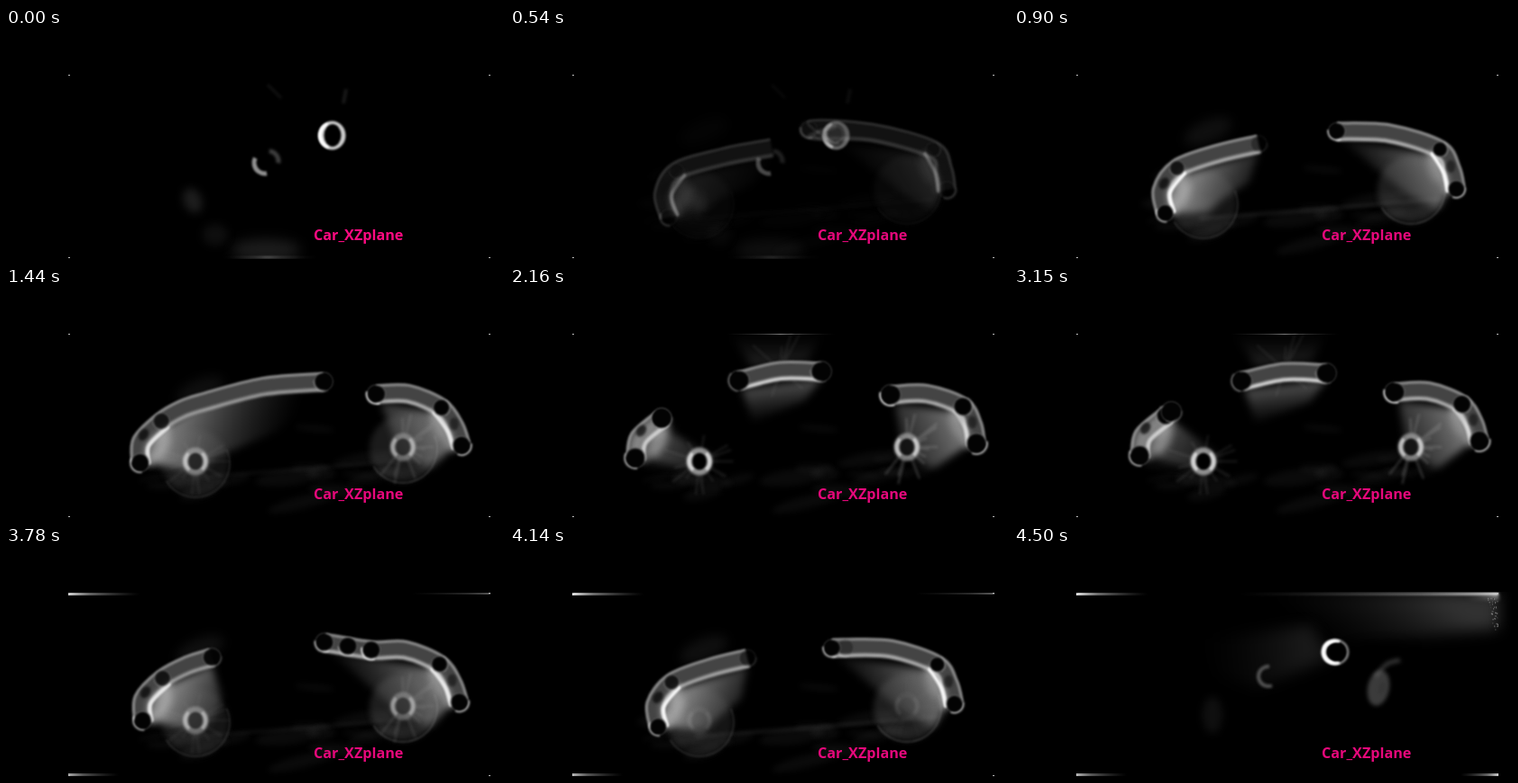
Animation of 552x257 px, one loop 5.22 s. Source, as an HTML page with a canvas:

```html
<!DOCTYPE html>
<html lang="en">
<head>
<meta charset="utf-8">
<title>Car slices</title>
<style>
html, body { margin: 0; width: 100%; height: 100%; overflow: hidden; background: #000; }
canvas { position: absolute; left: 0; top: 0; width: 552px; height: 257px; }
p {
  position: absolute; left: 341px; top: 219px; margin: 0; white-space: pre;
  font: 700 16.2px/22px "Open Sans", "Noto Sans", sans-serif; color: #f0087f;
}
</style>
</head>
<body>
<canvas width="552" height="257"></canvas>
<p>Car_XZplane</p>
<script>
const ctx = document.querySelector('canvas').getContext('2d');
const label = document.querySelector('p');
const LOOP = 5220, START = 540, END = 4500, STEP = 90, CENTER = 2560;
const HUBS = [[210, 194], [440, 178]];

// Each tube slides from its place at mid-car to its place at the side.
const tubes = {
  nose: { from: [139, 190], to: [168, 206], bend: 1.75 },
  grille: { from: [168, 146], to: [181, 156], bend: 1.8 },
  hood: { from: [168, 146], to: [272, 129], bend: 1.15, lift: 10 },
  roof: { from: [345, 94], to: [358, 115], bend: 1 },
  deck: { from: [422, 120], to: [360, 115], bend: 2.7 },
  tail: { from: [502, 133], to: [472, 135], bend: .7 },
  bumper: { from: [517, 174], to: [490, 179], bend: 1.3 }
};

const gray = (v, a = 1) => `rgba(${v},${v},${v},${a})`;
const mix = (p, q, u) => p.map((v, i) => v + (q[i] - v) * u);
const move = (p, x, y) => [p[0] + x, p[1] + y];
const mid = (p, q, x = 0, y = 0) => move(mix(p, q, .5), x, y);
const gap = (p, q) => Math.hypot(p[0] - q[0], p[1] - q[1]);
const ramp = (a, b, x) => Math.min(1, Math.max(0, (x - a) / (b - a)));

function seeded(s) {
  return () => (s = (s * 16807) % 2147483647) / 2147483647;
}

function paint(alpha, blur, draw) {
  if (alpha <= .01) return;
  ctx.save();
  ctx.globalAlpha = Math.min(1, alpha);
  ctx.filter = blur ? `blur(${blur}px)` : 'none';
  draw();
  ctx.restore();
}

function spline(points) {
  const path = new Path2D();
  path.moveTo(...points[0]);
  for (let i = 0; i < points.length - 1; i++) {
    const b = points[i], c = points[i + 1];
    const a = points[i - 1] || b, d = points[i + 2] || c;
    path.bezierCurveTo(b[0] + (c[0] - a[0]) / 6, b[1] + (c[1] - a[1]) / 6,
      c[0] - (d[0] - b[0]) / 6, c[1] - (d[1] - b[1]) / 6, c[0], c[1]);
  }
  return path;
}

// Shifts a left-to-right chain sideways; positive is outward.
function offset(points, n) {
  return points.map((p, i) => {
    const a = points[i - 1] || p, b = points[i + 1] || p, len = gap(a, b) || 1;
    return move(p, (b[1] - a[1]) / len * n, (a[0] - b[0]) / len * n);
  });
}

function line(path, color, width, alpha, blur, cap = 'butt') {
  paint(alpha, blur, () => {
    ctx.strokeStyle = color;
    ctx.lineWidth = width;
    ctx.lineCap = cap;
    ctx.lineJoin = 'round';
    ctx.stroke(path);
  });
}

function oval(x, y, rx, ry, color, alpha, blur, turn = 0) {
  paint(alpha, blur, () => {
    ctx.fillStyle = color;
    ctx.beginPath();
    ctx.ellipse(x, y, rx, ry, turn, 0, 7);
    ctx.fill();
  });
}

function arc(x, y, r, from, to, color, width, alpha, blur = 1) {
  const path = new Path2D();
  path.arc(x, y, r, from, to);
  line(path, color, width, alpha, blur);
}

function haze(points, from, to, strength, alpha, blur = 4) {
  paint(alpha, blur, () => {
    const g = ctx.createLinearGradient(...from, ...to);
    g.addColorStop(0, gray(190, strength));
    g.addColorStop(1, gray(90, 0));
    ctx.fillStyle = g;
    ctx.beginPath();
    points.forEach(p => ctx.lineTo(...p));
    ctx.fill();
  });
}

function streak(x0, x1, y, h, alpha, blur = .7) {
  paint(alpha, blur, () => {
    const g = ctx.createLinearGradient(x0, 0, x1, 0);
    g.addColorStop(0, '#fff');
    g.addColorStop(.3, gray(200, .6));
    g.addColorStop(1, gray(120, 0));
    ctx.fillStyle = g;
    ctx.fillRect(Math.min(x0, x1), y, Math.abs(x1 - x0), h);
  });
}

function rays(x, y, near, far, count, seed, alpha) {
  const rnd = seeded(seed), path = new Path2D();
  for (let i = 0; i < count; i++) {
    const a = rnd() * 6.28, n = near + (far - near) * (.3 + .7 * rnd());
    path.moveTo(x + near * Math.cos(a), y + near * Math.sin(a));
    path.lineTo(x + n * Math.cos(a), y + n * Math.sin(a));
  }
  line(path, '#aaa', 2.5, alpha, 1.8);
}

function shell(points, alpha, shine) {
  const chain = points.filter((p, i) => !i || gap(p, points[i - 1]) > 6);
  if (chain.length < 2) return;
  line(spline(chain), '#444', 20, alpha, 1.5);
  line(spline(offset(chain, 9)), '#999', 3, alpha * .85, 1.2);
  line(spline(offset(chain, -9)), '#ddd', 4, alpha * shine, 1.4);
}

function tube([x, y], r, dir, shine, alpha) {
  arc(x, y, r + .5, 0, 7, '#777', 1.5, alpha * .5);
  arc(x, y, r + 1, dir - 1.1, dir + 1.1, '#fff', 3, alpha * shine);
  oval(x, y, r, r, '#030303', alpha, 1);
}

function wheel([x, y], disc, hub, spokes, seed) {
  oval(x, y + 2, 37, 37, '#777', disc * .25, 3);
  arc(x, y + 2, 38, -.4, 2.6, '#aaa', 1.5, disc * .3);
  rays(x, y, 14, 45, 16, seed, spokes);
  oval(x, y, 14.5, 15.5, '#bbb', hub * .75, 1.8);
  arc(x, y, 11.5, 2.2, 4, '#fff', 4, hub * .6, 1.2);
  arc(x, y, 11.5, -.9, .9, '#fff', 4, hub * .6, 1.2);
  oval(x, y, 8, 9.5, '#000', hub, 1);
}

function opening(k) {
  oval(207, 192, 10, 14, '#555', k * .35, 5, -.4);
  oval(288, 247, 38, 12, '#777', k * .24, 7);
  oval(232, 230, 14, 12, '#444', k * .2, 5);
  line(spline([[290, 63], [305, 78]]), '#777', 3, k * .14, 1.5);
  line(spline([[377, 68], [374, 84]]), '#777', 4, k * .2, 1.5);
  streak(290, 345, 254, 2, k * .35, 1);
  streak(290, 240, 254, 2, k * .35, 1);
  arc(287, 150, 12, 1.4, 3.6, '#ccc', 5, k * .7, 1.2);
  arc(291, 148, 11, -1.5, .2, '#888', 5, k * .45, 1.4);
  oval(361.5, 119.5, 15, 16, '#ccc', k, 1);
  arc(361, 119.5, 13, 1.8, 4.4, '#fff', 4, k, .8);
  oval(362, 119.5, 9.5, 12.5, '#000', k, 1);
}

function closing(k) {
  haze([[195, 112], [270, 52], [537, 52], [537, 92], [372, 108], [260, 148]],
    [460, 48], [390, 138], .26, k, 8);
  haze([[205, 105], [330, 88], [350, 125], [270, 158], [225, 145]],
    [320, 110], [210, 120], .13, k, 8);
  oval(405, 114, 38, 8, '#000', k * .65, 5);
  oval(220, 188, 11, 20, '#444', k * .22, 4);
  line(spline([[428, 127], [414, 131], [400, 145]]), '#777', 5, k * .4, 2);
  oval(404, 158, 12, 20, '#777', k * .5, 2, .2);
  oval(408, 158, 4, 7, '#333', k * .6, 1.5, .3);
  arc(282, 145, 11, 1.2, 4.8, '#888', 4, k * .6, 1.4);
  arc(357, 118, 13, 0, 7, '#aaa', 3, k * .7);
  arc(355, 118, 12, 1.1, 5.2, '#fff', 5, k);
  oval(358, 118, 9.5, 10.5, '#000', k, 1);
  streak(537, 250, 52, 3, k * .8, 1);
  streak(537, 500, 53, 7, k * .5, 2);
  streak(537, 495, 253, 3, k * .8);
  const rnd = seeded(31);
  paint(k * .6, 0, () => {
    for (let i = 0; i < 55; i++) {
      ctx.fillStyle = gray(Math.floor(40 + rnd() * 150));
      const y = rnd();
      ctx.fillRect(536 - rnd() * 12 * (1 - y * .6), 55 + y * 38, 1, 1.5);
    }
  });
}

function mist(alpha) {
  const rnd = seeded(77);
  for (let i = 0; i < 20; i++) {
    oval(170 + rnd() * 300, 150 + rnd() * 90, 12 + rnd() * 28, 3 + rnd() * 6,
      '#888', alpha * .07, 3, rnd() * .4 - .3);
  }
}

function pose(d, late) {
  const u = ramp(.25, .86, d) + ramp(.86, 1, d) * .15, p = {};
  for (const name in tubes) {
    const { from, to, bend, lift = 0 } = tubes[name];
    p[name] = move(mix(from, to, u ** bend), 0, -lift * 4 * u * (1 - u));
    if (late && name !== 'roof') p[name][1] -= 3 * ramp(.2, .3, d);
  }
  p.pillar = mix([254, 104], p.hood, ramp(.3, .55, d));
  return p;
}

function body(d, late) {
  const p = pose(d, late);
  const k = ramp(late ? .99 : 1.1, .88, d);
  const glare = ramp(.3, .85, d), disc = ramp(.35, .6, d) * k;
  const hub = ramp(.85, .6, d) * (1 - .3 * disc), inner = ramp(.5, .3, d);
  const cabin = ramp(.625, .58, d), link = 1 - cabin;
  const joined = gap(p.pillar, p.hood) < 6 && cabin > .5;
  const r = 10.5 - 2 * ramp(.25, .86, d);

  const noseBulge = mid(p.nose, p.grille, -11), tailBulge = mid(p.tail, p.bumper, 4);
  const top = [p.pillar, mid(p.pillar, p.roof, 0, -6), p.roof];
  const front = [p.nose, noseBulge, p.grille, mid(p.grille, p.hood, 0, -3), p.hood];
  const rear = [p.deck, mid(p.deck, p.tail, 0, -8), p.tail, tailBulge, p.bumper];
  if (link > .5) rear.unshift(p.roof);
  if (joined) front.push(...top);
  const end = joined ? p.roof : p.hood, start = rear[0];

  mist(k);
  oval(215, 115, 28, 12, '#666', disc * .15, 6, -.4);
  line(spline([[205, 212], [310, 204], [475, 190]]), '#888', 3, k * glare * .2, 2);

  // Scatter around the roof, then light spilling inside each end.
  haze([[268, 88], [245, 54], [345, 54], [330, 82]], [300, 96], [300, 50], .25, inner, 5);
  rays(300, 92, 10, 48, 14, 9, inner * .1);
  haze([move(p.pillar, 3, 10), move(p.roof, 0, 8), move(p.roof, -18, 32), move(p.pillar, 15, 46)],
    move(p.roof, -40, 5), move(p.roof, -34, 56), .55, joined ? 0 : k * cabin);
  haze([move(p.nose, 8, 0), move(p.grille, 2, 10), ...(joined ? top : []), move(end, 0, 9),
    mid(end, HUBS[0], 20, 10), [232, 190], [215, 206]],
    mid(p.nose, p.grille, 20), move(mix(HUBS[0], end, .3), 50, 40), .75, k * (.45 + .45 * disc));
  haze([move(start, 5, 10), move(p.tail, -8, 6), move(p.bumper, -7, 0), [470, 202], [436, 185]],
    move(p.tail, 8, 10), [385, 195], .75, k);
  wheel(HUBS[0], disc * .7, hub, hub * .12, 5);
  wheel(HUBS[1], disc, hub * .85, hub * .25, 19);

  oval(...mid(p.nose, p.grille, 10, 5), 9, 18, '#bbb', k * .6, 4, .5);
  oval(...mid(p.tail, p.bumper, -14, -2), 8, 18, '#bbb', k * .35, 4, -.3);
  shell(front, k, .5 + .2 * glare);
  shell(rear, k, .75);
  if (!joined) shell(top, k * cabin, 1);

  // The bumpers' inner skin burns out to white.
  const skin = spline(offset(front.slice(0, 3), -10));
  const stern = spline(offset(rear.slice(-3), -10));
  for (const path of [skin, stern]) {
    line(path, '#fff', 9, k * .3, 3, 'round');
    line(path, '#fff', 4, k * (.45 + .5 * glare), 1.3, 'round');
  }
  line(spline(front.slice(0, 3)), '#fff', 12, inner * .35, 3);
  oval(...mid(p.nose, p.grille, -8, -8), 5, 7, '#080808', k * .75, 1.5, .6);
  oval(...mid(p.tail, p.bumper, 3, -3), 5, 7, '#111', k * .6, 1.5);

  tube(p.nose, r, 2.5, .5, k);
  tube(p.grille, r - 1, 2, .1, k * (.75 + .25 * inner));
  tube(p.hood, r, 1, .15, joined ? 0 : k * ramp(1, .6, d));
  tube(p.pillar, r, 2.8, .25, k * cabin * (joined ? 0 : 1));
  tube(mid(p.roof, p.deck), r, 2, .3, k * link * ramp(25, 40, gap(p.roof, p.deck)));
  tube(p.deck, r, 2.3, .7, k * ramp(8, 30, gap(p.roof, p.deck)));
  tube(p.roof, r, 2.2, .15 + .4 * link, k);
  tube(p.tail, r - 1, 0, .15, k);
  tube(p.bumper, r, .9, .55, k);

  streak(300, 360, 52, 1, inner * .5, 0);
  streak(300, 240, 52, 1, inner * .5, 0);
}

function frame(t) {
  const late = t > CENTER, d = Math.abs(t - CENTER) / (END - CENTER);
  const edge = late ? ramp(.35, .65, d) * .9 : 0;
  ctx.fillStyle = '#000';
  ctx.fillRect(0, 0, 552, 257);
  if (late) closing(ramp(.85, 1, d));
  else opening(ramp(.88, 1.2, d));
  body(d, late);
  streak(69, 148, 52, 3, edge);
  streak(69, 125, 253, 3, edge * .8);
  streak(537, 450, 52, 2, edge * .4);
  ctx.clearRect(0, 0, 552, 51);
  ctx.fillStyle = '#bbb';
  for (const x of [69, 535]) for (const y of [52, 255]) ctx.fillRect(x, y, 2, 1);
  label.style.color = t < START ? '#ff0a82' : '#e6087b';
}

function sample(t) {
  if (t < START) return 0;
  if (t >= END) return END;
  const s = START + Math.floor((t - START) / STEP) * STEP;
  return s === 810 || s === 4410 ? s - STEP : s;
}

let shown = -1;
function tick() {
  const t = sample(performance.now() % LOOP);
  if (t !== shown) frame(shown = t);
  requestAnimationFrame(tick);
}
tick();
</script>
</body>
</html>
```
